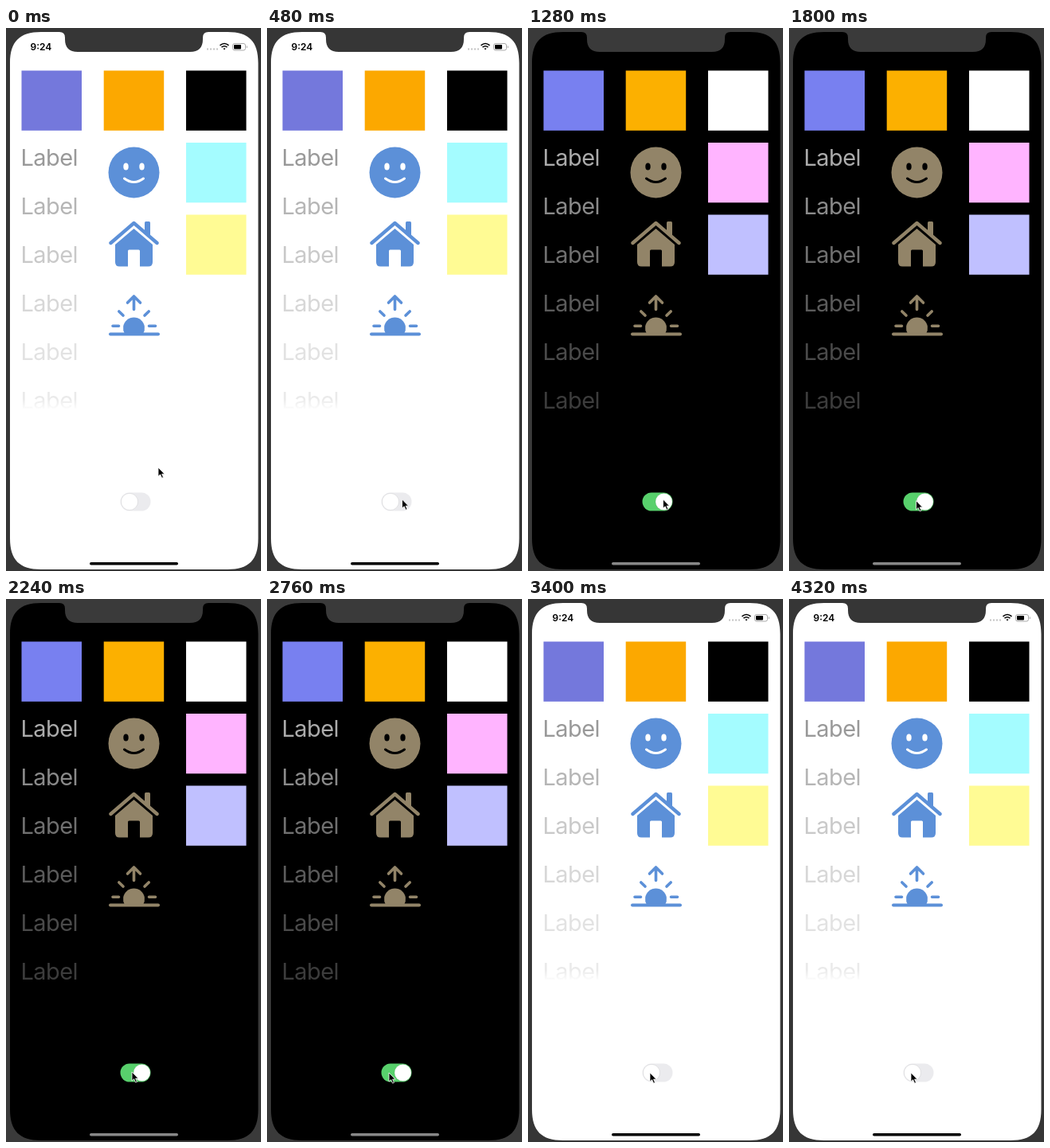
An HTML page that plays this animation: 320x682 px, repeating every 4360 ms.

```html
<!DOCTYPE html>
<html lang="en">
<head>
<meta charset="utf-8">
<title>Theme switch</title>
<style>
  html, body { margin: 0; width: 100%; height: 100%; overflow: hidden; }
  svg {
    display: block; width: 100vw; height: 100vh;
    --bezel: #363636; --screen: #fff; --ink: #000; --home: #000;
    --violet: #7478dc; --orange: #fca800; --box: #000; --top: #a4fcff; --low: #fffb94;
    --icon: #5c90d8; --track: #ebebee;
    background: var(--bezel);
  }
  svg.dark {
    --bezel: #3a3a3a; --screen: #000; --ink: #fff; --home: #888;
    --violet: #7880f0; --orange: #fcb000; --box: #fff; --top: #ffb4ff; --low: #c0c0ff;
    --icon: #928468; --track: #58d06c;
  }
  .dark .light-only { display: none; }
  text { font-family: Inter, "Liberation Sans", sans-serif; }
  #labels { font-size: 29px; letter-spacing: -.6px; fill: var(--ink); }
  .icon { fill: var(--icon); }
  .line { fill: none; stroke: var(--icon); stroke-linecap: round; stroke-linejoin: round; }
  .hole { fill: var(--screen); }
</style>
</head>
<body>
<svg id="stage" viewBox="0 0 320 682">
  <defs>
    <linearGradient id="fade" x1="0" y1="0" x2="0" y2="1">
      <stop stop-color="#fff" stop-opacity="0"/>
      <stop offset="1" stop-color="#fff"/>
    </linearGradient>
  </defs>
  <path fill="var(--screen)" d="M5 44C5 17 17 5 44 5H67Q74 5 74 12V14Q74 30 90 30H231Q247 30 247 14V12Q247 5 254 5H278C305 5 316.500 17 316.500 44V641C316.500 668 305 680 278 680H44C17 680 5 668 5 641Z"/>

  <g class="light-only">
    <text x="30.500" y="28" font-size="12" font-weight="600">9:24</text>
    <path d="M252 26.500h14" stroke="#c4c4c4" stroke-width="2" stroke-dasharray="2 2"/>
    <g fill="none" stroke="#000" stroke-width="1.600">
      <path d="M268.500 21.800Q274 17.200 279.500 21.800M270.500 24.200Q274 21.400 277.500 24.200"/>
      <path d="M274 27.500l-1.500-1.700q1.500-1 3 0z" fill="#000" stroke="none"/>
    </g>
    <rect x="284.500" y="19.500" width="16" height="8.500" rx="2.500" fill="none" stroke="#aaa"/>
    <rect x="286" y="21" width="9" height="5.500" rx="1"/>
    <path d="M302.300 22.500v2.500" stroke="#aaa"/>
  </g>

  <g id="squares"></g>
  <g id="labels"></g>
  <rect class="light-only" x="19" y="466" width="73" height="14" fill="url(#fade)"/>

  <g>
    <circle class="icon" cx="160.500" cy="181.500" r="32"/>
    <ellipse class="hole" cx="150.500" cy="174" rx="3.200" ry="4.500"/>
    <ellipse class="hole" cx="170.500" cy="174" rx="3.200" ry="4.500"/>
    <path d="M148.500 189Q160.500 198 172.500 189" fill="none" stroke="var(--screen)" stroke-width="3" stroke-linecap="round"/>
  </g>
  <g>
    <path class="icon" d="M174 258V244.500Q174 243 175.500 243H179.500Q181 243 181 244.500V264Z"/>
    <path class="line" stroke-width="4.400" d="M131.500 270L160.500 245L189.500 270"/>
    <path class="icon" d="M137 272L160.500 252L184 272V294Q184 299.500 178.500 299.500H168V280Q168 278.500 166.500 278.500H154.500Q153 278.500 153 280V299.500H142.500Q137 299.500 137 294Z"/>
  </g>
  <g>
    <path class="icon" d="M149 384A13.500 13.500 0 1 1 172 384Z"/>
    <path class="line" stroke-width="4" d="M131 384.500H191"/>
    <path class="line" stroke-width="3.600" d="M134 374.200H141.500M179.500 374.200H187.500M141.800 356L147 361M179.200 356L174 361M160.500 337V353.500M152.500 345L160.500 337L168.500 345"/>
  </g>

  <rect x="143.500" y="583.500" width="38" height="23" rx="11.500" fill="var(--track)"/>
  <rect id="thumb" y="584.500" height="21" rx="10.500" fill="#fff" stroke="#000" stroke-opacity=".08"/>
  <rect x="105" y="671" width="111" height="3.500" rx="1.750" fill="var(--home)"/>
  <path id="cursor" d="M0 0V11.200L2.600 8.800L4.600 13.200L6.500 12.400L4.600 8.200H8Z" stroke="#fff" stroke-width=".8"/>
</svg>
<script>
  const LOOP = 4360, DARK_ON = 1280, DARK_OFF = 3400;
  const el = id => document.getElementById(id);
  const stage = el("stage"), thumb = el("thumb"), cursor = el("cursor");

  const boxes = [[19.5, 53.5, "violet"], [122.7, 53.5, "orange"], [226, 53.5, "box"],
                 [226, 144, "top"], [226, 234.5, "low"]];
  el("squares").innerHTML = boxes.map(([x, y, name]) =>
    `<rect x="${x}" y="${y}" width="75.5" height="75.3" fill="var(--${name})"/>`).join("");

  el("labels").innerHTML = Array.from({ length: 6 }, (_, i) =>
    `<text x="18.5" y="${173 + 61 * i}">Label</text>`).join("");
  const labels = [...el("labels").children];

  // Eased 0..1 progress of t between two times
  const ease = (t, from, to) => {
    const p = Math.min(1, Math.max(0, (t - from) / (to - from)));
    return p * p * (3 - 2 * p);
  };

  // Start time, end time, dx, dy
  const moves = [[40, 480, -21.5, 40], [1400, 1920, -11.5, 2], [2280, 2520, -5, 1]];

  function draw(t) {
    const dark = t >= DARK_ON && t < DARK_OFF;
    stage.classList.toggle("dark", dark);
    labels.forEach((label, i) =>
      label.setAttribute("fill-opacity", dark ? .67 * .81 ** i : .4 * .73 ** i));

    const press = t < DARK_ON ? ease(t, 1080, 1220) : dark ? ease(t, 3200, 3340) : 0;
    const width = 21 + 5 * press;
    thumb.setAttribute("width", width);
    thumb.setAttribute("x", dark ? 181 - width : 144.5);

    let x = 191, y = 552;
    for (const [from, to, dx, dy] of moves) {
      const p = ease(t, from, to);
      x += dx * p;
      y += dy * p;
    }
    cursor.setAttribute("transform", `translate(${x} ${y})`);
  }

  const start = performance.now();
  function tick() {
    draw((performance.now() - start) % LOOP);
    requestAnimationFrame(tick);
  }
  tick();
</script>
</body>
</html>
```
